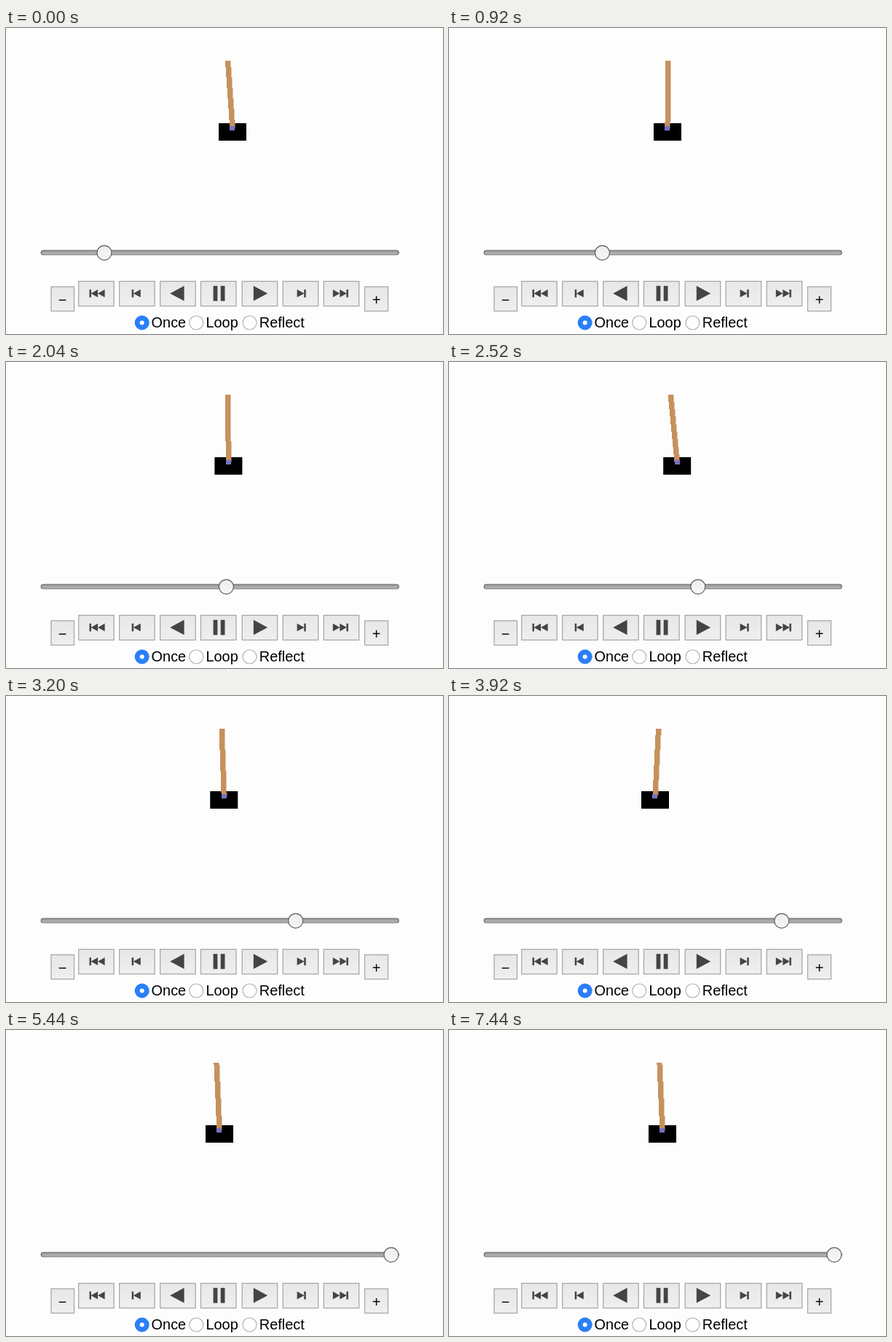
An HTML page with a canvas that plays this animation: 600 px wide and 421 px high, repeating every 7800 ms.

```html
<!DOCTYPE html>
<html>
<head>
<meta charset="utf-8">
<style>
  html, body { margin: 0; width: 100%; height: 100%; overflow: hidden; background: #fefdfe; }
  canvas { display: block; }
</style>
</head>
<body>
<canvas id="stage" width="600" height="421"></canvas>
<script>
const c = document.getElementById('stage').getContext('2d');
const LOOP = 7800, RUN = 4800, STEP = 40;
const AXIS = 292.2, MID = 365.2, ICON = '#444';

// Turning points of the balancing act: time, cart centre, sideways lean of the pole tip
const poses = [
  [0, 311, -6.5], [240, 314.5, -8], [920, 300, 1], [1600, 295.6, 7.2],
  [2520, 313.2, -9], [3920, 283, 4.5], [RUN, 293, -4]
];

// Smooth curve through column k of the poses
function pose(k, t) {
  const last = poses.length - 1;
  const i = Math.max(0, poses.findIndex(p => p[0] > t) - 1);
  const slope = j => {
    const a = poses[Math.max(j - 1, 0)], b = poses[Math.min(j + 1, last)];
    return (b[k] - a[k]) / (b[0] - a[0]);
  };
  const a = poses[i], b = poses[i + 1], d = b[0] - a[0];
  const u = (t - a[0]) / d, w = 1 - u;
  return a[k] * w * w * (1 + 2 * u) + b[k] * u * u * (1 + 2 * w)
    + d * u * w * (slope(i) * w - slope(i + 1) * u);
}

function rect(x, y, w, h, color) {
  c.fillStyle = color;
  c.fillRect(x, y, w, h);
}

function shade(y0, y1, from, to) {
  const g = c.createLinearGradient(0, y0, 0, y1);
  g.addColorStop(0, from);
  g.addColorStop(1, to);
  return g;
}

function disc(x, y, r, fill, stroke) {
  c.beginPath();
  c.arc(x, y, r, 0, 7);
  c.fillStyle = fill;
  c.fill();
  if (stroke) {
    c.strokeStyle = stroke;
    c.stroke();
  }
}

function button(x, y, w, h) {
  rect(x, y, w, h, shade(y, y + h, '#e8e7e8', '#f0eff0'));
  c.strokeStyle = '#a5a4a5';
  c.strokeRect(x + 0.5, y + 0.5, w - 1, h - 1);
}

function arrow(x, w, half) {
  c.beginPath();
  c.moveTo(x, MID - half);
  c.lineTo(x + w, MID);
  c.lineTo(x, MID + half);
  c.fillStyle = ICON;
  c.fill();
}

function bar(x, w, half) {
  rect(x, MID - half, w, 2 * half, ICON);
}

// Play, step and skip, laid out from the middle towards the right
function forwardButtons() {
  for (let i = 0; i < 3; i++) button(31.5 + 56 * i, 348, 49.5, 35);
  arrow(47.6, 19.4, 10.4);
  arrow(107.4, 10, 5.4);
  bar(117, 2.5, 5.4);
  arrow(156.6, 9.5, 5.4);
  arrow(166.1, 9.5, 5.4);
  bar(175.2, 2.5, 5.4);
}

function label(text, x, y, align = 'left') {
  c.textAlign = align;
  c.fillStyle = '#000';
  c.fillText(text, x, y);
}

function controls() {
  for (const side of [1, -1]) {
    c.save();
    c.translate(AXIS, 0);
    c.scale(side, 1);
    forwardButtons();
    c.restore();
  }
  button(267, 348, 49.5, 35);
  bar(284.6, 5.8, 10.4);
  bar(294.7, 5.8, 10.4);

  button(61.5, 355.5, 32.5, 34.5);
  button(492, 355.5, 33, 34.5);
  label('\u2212', 77.5, 381, 'center');
  label('+', 508.5, 381, 'center');

  disc(186.7, 405.5, 10, '#2a7ff7');
  disc(186.7, 405.5, 3, '#fff');
  disc(261.3, 405.5, 9.5, '#fefefe', '#b4b3b5');
  disc(334.5, 405.5, 9.5, '#fefefe', '#b4b3b5');
  label('Once', 199.6, 412);
  label('Loop', 274.5, 412);
  label('Reflect', 347.8, 412);
}

function slider(x) {
  c.beginPath();
  c.roundRect(48.2, 306, 491, 6, 3);
  c.fillStyle = shade(306, 312, '#969696', '#bababa');
  c.fill();
  c.strokeStyle = shade(305, 313, '#606060', '#787878');
  c.stroke();
  disc(x, 309.3, 10, shade(299, 319, '#eeedee', '#f8f7f8'), '#606060');
}

function cartPole(x, lean) {
  const top = 45, pivot = 138;
  rect(x - 19, 131, 38, 24, '#000');
  // Row by row, so the slanted edges stay stepped
  for (let y = top; y < pivot; y++) {
    const mid = x + lean * (pivot - y) / (pivot - top);
    rect(Math.round(mid - 3.6), y, 7.5, 1, '#c6915c');
  }
  rect(Math.round(x - 3.6), 135, 7, 6, '#7672c4');
}

function draw() {
  const now = Math.floor(performance.now() % LOOP / STEP) * STEP;
  const t = Math.min(now, RUN - 1);
  rect(0, 0, 600, 421, '#fefdfe');
  c.lineWidth = 1.2;
  c.font = '19.9px "Liberation Sans", Arial, sans-serif';
  cartPole(pose(1, t), pose(2, t));
  slider(135 + 394 * t / RUN);
  controls();
  requestAnimationFrame(draw);
}
draw();
</script>
</body>
</html>
```
